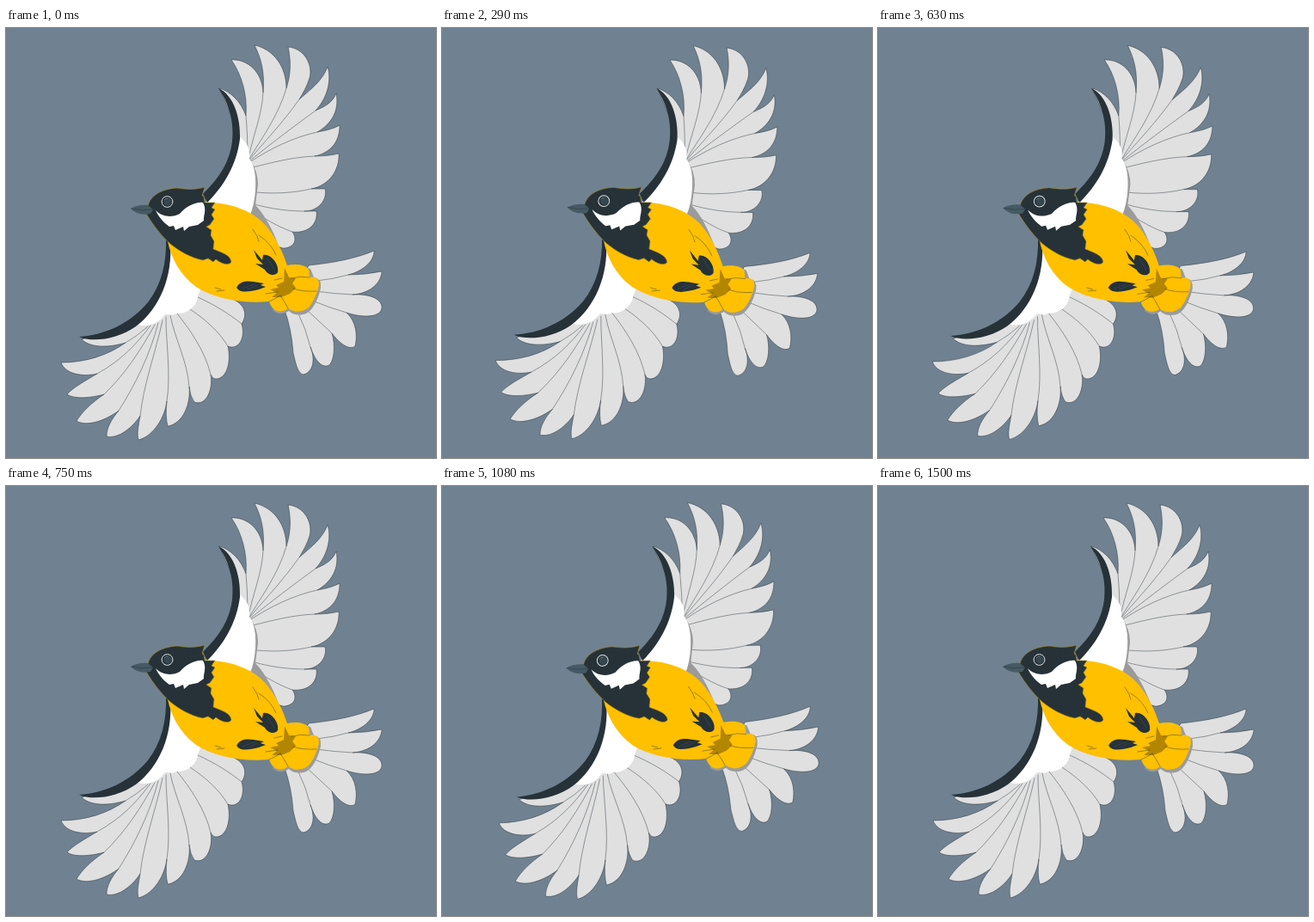
Recreate the animation shown at these times as an HTML page. Size 500 by 500 pixels, loop 1540 ms.

```html
<!DOCTYPE html>
<html lang="en">
<head>
<meta charset="utf-8">
<title>Flying bird</title>
<style>
html, body { margin: 0; width: 100%; height: 100%; overflow: hidden; background: #708291; }
svg { display: block; width: 100vw; height: 100vh; }
.feather { fill: #e0e0e0; stroke: #263238; stroke-width: .5; stroke-linejoin: round; }
.line { fill: none; stroke: #263238; stroke-width: .45; stroke-linecap: round; }
.dark { fill: #263238; }
.white { fill: #fff; }
.yellow { fill: #ffc000; }
.gold { fill: #b38600; }
.shade { fill: #9b9b9b; }
</style>
</head>
<body>
<svg viewBox="0 0 500 500">
  <g id="bird">
    <g id="rightWing">
      <path class="feather" d="M248 70C261 74 273 85 279 102C281 78 274 54 262 37C281 36 298 51 299 75
        C301 52 297 36 289 20C312 25 326 46 326 70C332 52 331 36 328 22C348 24 357 44 353 58C350 68 345 76 341 83
        C356 70 368 61 374 45C379 62 373 82 360 96C372 91 380 86 384 76C388 96 378 112 362 121
        C373 119 381 117 388 113C388 133 377 145 359 149C370 149 379 148 387 146C388 165 376 183 355 187
        L371 187C374 200 363 213 347 213L361 213C363 229 350 239 333 237C340 247 334 256 322 256
        C306 252 296 232 285 214L250 190L270 120Z"/>
      <path class="line" d="M279 102Q281 124 281 151M299 75C298 100 287 126 282 151M326 70C317 102 296 130 283 152
        M341 83C322 110 299 134 283 153M360 96C335 114 305 137 284 154M362 121C334 127 306 141 285 155
        M359 149C333 150 307 157 287 162M355 187C334 192 312 193 291 191M347 213C327 213 307 210 289 205M333 237C315 231 299 220 287 213"/>
      <path class="shade" d="M284 154Q293 166 293 182L290 206C301 217 310 235 317 253L304 242L280 218L288 190Z"/>
      <path class="white" d="M271 126C279 131 285 141 283 152C289 159 291 174 290 188Q289 205 284 217L231 204Q263 168 271 126Z"/>
      <path class="dark" d="M247 70C265 78 273 105 272 129C268 160 253 184 234 203L229 193C247 175 260 157 263 132C266 106 257 85 247 70Z"/>
    </g>

    <g id="leftWing">
      <path class="feather" d="M88 362C99 373 122 371 139 366C118 381 92 389 64 389C69 402 88 406 106 402
        C91 411 78 418 71 426C80 432 99 430 114 426C99 436 88 447 82 457C95 464 116 456 131 445
        C122 456 117 465 117 475C132 478 148 463 156 451C154 463 152 471 154 479C173 474 185 451 187 434
        Q185 451 188 463C206 460 215 437 213 417Q214 428 219 435C233 440 241 420 238 403Q240 408 244 408C257 408 262 388 258 370
        C270 375 279 361 274 344C281 334 278 322 265 316L222 300L185 320L150 345Z"/>
      <path class="line" d="M139 366Q153 358 165 347M106 402C133 387 151 369 168 346M114 426C139 402 157 374 173 345
        M131 445C151 414 168 378 177 343M156 451C160 414 174 377 182 340M187 434C192 402 186 367 186 336
        M213 417C211 387 196 361 191 334M238 403C232 377 215 352 199 332M258 370C248 353 232 339 214 327M274 344C259 332 241 321 223 313"/>
      <path class="white" d="M189 250C189 288 177 325 153 345C165 348 177 344 185 333C191 333 194 335 198 332C210 333 222 324 223 312L230 295L200 250Z"/>
      <path class="dark" d="M186 244C187 273 181 298 165 319C144 344 115 357 85 359C100 366 130 362 151 347C179 326 194 289 191 249Z"/>
    </g>

    <g id="tail">
      <path class="feather" d="M352 276C381 273 407 268 428 259C428 272 414 283 398 287Q418 287 437 283C436 299 420 309 403 310
        C421 309 437 314 437 325C436 337 415 337 396 331C407 341 409 357 406 370C399 375 388 367 379 355
        C383 369 382 385 376 392C366 397 358 383 354 371C360 386 357 400 346 403C339 402 337 390 334 378Q332 350 324 328Z"/>
      <path class="line" d="M398 287Q381 292 361 294M403 310Q381 309 360 306M396 331Q375 325 356 317M379 355Q364 341 349 327M354 371Q349 350 339 330"/>
      <path class="shade" d="M345 277L354 280L358 290Q367 291 366 302C363 316 356 331 346 333Q335 335 329 329Q319 336 310 328Z"/>
    </g>

    <g id="body">
      <path class="yellow" d="M238 203C264 204 290 214 304 232C315 246 322 261 327 276C336 274 349 275 352 281L353 290
        C362 288 366 294 363 303C360 313 354 325 349 327Q338 333 328 326Q321 332 313 328Q308 325 306 318C274 321 241 314 221 301
        C202 287 192 267 188 248L210 220Z"/>
      <path class="gold" d="M324 279L329 290L337 291L333 297L337 302L330 309L320 313L309 313L315 308L307 304L317 302L314 299L323 295Z"/>
      <path class="line" d="M353 290Q342 288 332 291M361 306Q344 307 334 303M328 326Q323 317 319 311M306 318Q313 315 319 311"/>
      <path class="line" d="M287 234Q293 242 294 248M294 241Q308 250 314 264M243 302L250 304M245 306L254 305M302 309L316 307M312 293L321 291"/>
      <path class="dark" d="M288 258L298 270L299 264C308 262 318 275 316 284C312 290 303 286 301 281L290 274L299 275L292 268Z"/>
      <path class="dark" d="M268 302C272 294 280 294 288 295L300 297L296 299L302 301L294 304C285 306 277 308 271 305Z"/>
      <path class="line" style="stroke:#455a64" d="M275 303L288 298M281 304L292 299M304 268L312 281"/>
    </g>

    <g id="head">
      <path class="dark" stroke="#a98a1c" stroke-width=".6" d="M165 207C168 194 182 187 199 186C211 188 221 188 231 185L228 195L230 196L231 203L243 203L239 209L243 211L239 217L242 222L237 229L233 231
        L239 235L238 241L242 248L241 257C251 261 261 264 262 272C259 277 250 274 244 269L241 272L235 268L229 270
        C214 267 201 259 191 251C180 241 171 229 163 216Z"/>
      <path class="white" d="M174 212C183 221 194 220 202 216C210 207 221 202 229 203C234 211 229 219 230 224L223 229L213 231
        L207 236L206 231L197 235L195 230L190 231C183 226 177 219 174 212Z"/>
      <path fill="#455a64" d="M145 210Q154 205 165 206L171 211L168 216Q154 219 145 210Z"/>
      <path class="line" d="M146 210Q158 213 171 211"/>
      <circle cx="187.5" cy="202" r="6.4" fill="#263238" stroke="#e0e0e0" stroke-width="1"/>
      <circle cx="188" cy="202" r="4.6" fill="#37474f"/>
      <path class="line" style="stroke:#90a4ae" d="M184 200Q185 198 188 198"/>
    </g>
  </g>
</svg>
<script>
const bird = document.getElementById('bird');
const LOOP = 1540, SWING = 1500, FPS = 24;

// Linear rocking in degrees: 0, then 1 at a quarter, -1 at three quarters, back to 0.
function tilt(t) {
  const p = Math.min(t / SWING, 1);
  return p < .25 ? 4 * p : p < .75 ? 2 - 4 * p : 4 * p - 4;
}

function draw(now) {
  const step = Math.floor((now % LOOP + 4) * FPS / 1000);
  bird.setAttribute('transform', `rotate(${tilt(step * 1000 / FPS)} 250 250)`);
  requestAnimationFrame(draw);
}
draw(performance.now());
</script>
</body>
</html>
```
